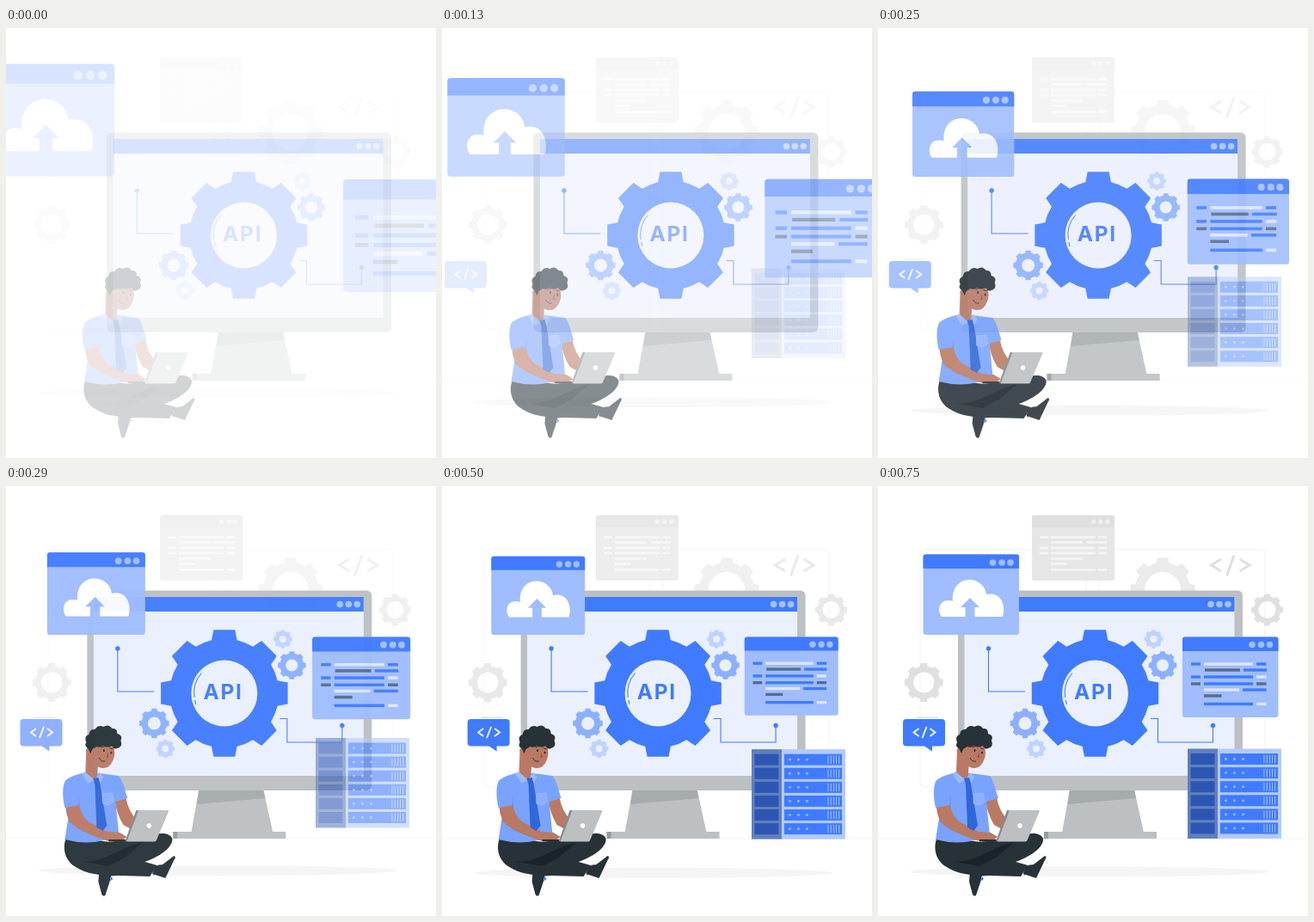
An HTML page for the animation above (0.93 s loop, 500 by 500 pixels).

```html
<!DOCTYPE html>
<html lang="en">
<head>
<meta charset="utf-8">
<title>API illustration</title>
<style>
  html, body { margin: 0; width: 100%; height: 100%; overflow: hidden; background: #fff; }
  svg { display: block; width: 100%; height: 100%; }
  .blue { fill: #407bff; }
  .dark { fill: #263238; }
  .skin { fill: #b97964; }
  .shirt { fill: #79a3ff; }
  .line { fill: none; stroke: #407bff; stroke-width: 1.1; }
</style>
</head>
<body>
<svg viewBox="0 0 500 500">
  <g id="backdrop">
    <g fill="none" stroke="#ebebeb" stroke-width=".7">
      <path d="M0 410H500"/>
      <rect x="49" y="74" width="193" height="276" rx="4"/>
      <rect x="257" y="74" width="193" height="276" rx="4"/>
    </g>
    <rect x="179" y="34" width="96" height="76" rx="3" fill="#e6e6e6"/>
    <path d="M179 48V37q0-3 3-3h90q3 0 3 3V48z" fill="#dfdfdf"/>
    <g id="greyLines"></g>
    <g fill="none" stroke="#e0e0e0" stroke-width="3">
      <path d="M399 85L387.500 92L399 99M414 80.500L405.500 104.500M420.500 85L432 92L420.500 99"/>
    </g>
  </g>

  <ellipse id="shadow" cx="246" cy="448.500" rx="208" ry="6" fill="#f5f5f5"/>

  <g id="monitor">
    <path d="M223 353H298L309 403H214z" fill="#bcc0c2"/>
    <path d="M223 353H298L300 363L220.500 370z" fill="#a6abad"/>
    <rect x="193" y="402" width="131" height="8" fill="#bcc0c2"/>
    <rect x="193" y="402" width="5" height="8" fill="#969b9e"/>
    <rect x="93" y="121.500" width="331" height="232.500" rx="6" fill="#bcc0c2"/>
    <rect x="100.500" y="129" width="314" height="208" fill="#ebf0ff"/>
    <rect x="100.500" y="129" width="314" height="17" class="blue"/>
    <path class="line" d="M128.500 189V239H171M317 270.500H325.500V298H389.500V279"/>
    <circle cx="128.500" cy="189" r="2.700" class="blue"/>
    <circle cx="389.500" cy="278.500" r="2.700" class="blue"/>
    <path class="line" d="M226 217.500A35 35 0 0 0 217.700 246M218.200 249L219.500 254"/>
    <text x="251.200" y="248" text-anchor="middle" font-family="Inter, sans-serif" font-size="24.500"
      font-weight="700" letter-spacing="1.700" class="blue">API</text>
  </g>

  <g id="server">
    <rect x="395" y="305.500" width="74" height="104.500" fill="#b1caff"/>
    <rect x="360" y="305.500" width="35" height="104.500" fill="#6080bd"/>
  </g>

  <g id="windows">
    <g id="upload">
      <rect x="52.500" y="79.500" width="111.500" height="93.500" rx="3" fill="#9fbdff"/>
      <path class="blue" d="M52.500 96V82.500q0-3 3-3H161q3 0 3 3V96z"/>
      <path fill="#fff" d="M74 152C69 146 70 133 82 133Q85 133 87 134C84 102 123 102 126 126C143 122 149 139 145 152z"/>
      <path fill="#9fbdff" d="M107 130L118 141H112.500V152.500H101.500V141H96z"/>
    </g>
    <g id="code">
      <rect x="354" y="175.500" width="111.500" height="93.500" rx="3" fill="#9fbdff"/>
      <path class="blue" d="M354 192V178.500q0-3 3-3H462.500q3 0 3 3V192z"/>
    </g>
  </g>

  <g id="man">
    <path class="skin" d="M120 446L137 444L136 452L120 454zM166 443L178 440L181 447L170 453z"/>
    <path class="dark" d="M69 408C64 419 66 434 78 442C92 452 112 453 129 453L166 454L174 441L160 437C180 430 193 419 192 410C189 402 176 403 162 407L120 414z"/>
    <path d="M84 436C103 440 122 428 142 419L158 414L137 432L118 442z" fill="#1a2328"/>
    <path class="dark" d="M107 447L121 452L119 461L114 476Q112 478 110 475L106 460zM172 442L181 440L194 430Q197 431 194 435L184 456L169 451z"/>
    <path d="M119 460L121 454L123 457z" class="blue"/>
    <path class="skin" d="M125 365L138 362Q141 379 151 388L144 399L135 394Q127 381 125 365z"/>
    <path class="shirt" d="M91 333L107 334L130 337C135 344 137 354 140 363L126 367L130 406Q100 420 67 411L73 374L67 374C64 361 64 348 68 342Q76 336 91 333z"/>
    <path d="M84 352Q83 364 85 371L74 374L71 390L89 403L83 372z" fill="#6691f0"/>
    <path class="skin" d="M68 374L84 371Q86 383 94 390L117 402L131 403L139 408L134 412L118 413Q91 405 76 394Q69 387 68 374z"/>
    <path class="skin" d="M92 306L106 318L105 333Q105 341 101 342Q94 338 91 332z"/>
    <path d="M90 332L102 342L94 346L87 335zM102 342L107 333L112 338L108 346z" fill="#9abaff"/>
    <path d="M100 340L106 339L108 346L116 395L111 401L104 397L102 347z" fill="#2f66d8"/>
    <path d="M111 358L122 357L124 367L118 371L111 369z" fill="#8cb0ff" stroke="#a9c4ff" stroke-width=".6"/>
    <path class="skin" d="M98 300Q110 292 123 300Q127 311 123 319Q119 329 110 328Q102 326 99 319L94 313Q89 306 95 303z"/>
    <path class="dark" d="M99 306L97 311L94 305Q89 303 92 298Q89 291 95 289Q96 282 102 283Q106 277 112 280Q118 276 122 282Q128 281 128 288Q135 290 132 296Q135 303 128 305Q124 307 122 302Q116 305 112 302Q108 305 104 303z"/>
    <path class="dark" d="M111.500 307.500a1 1.500 0 1 0 2 0a1 1.500 0 1 0-2 0M120 310a1 1.500 0 1 0 2 0a1 1.500 0 1 0-2 0"/>
    <path d="M117 309L118 316L115.500 316" fill="#a24e3f"/>
    <path d="M107 316Q109 321 114 320M110 304L114 302.500M119 304.500L123 306" fill="none" stroke="#263238" stroke-width=".9"/>
    <path d="M118 411H172V413.500H118z" fill="#263238"/>
    <path d="M150 377L153 377L142 413H137z" fill="#858b8e"/>
    <path d="M153 377H186.500Q188.500 377 187.500 379L173.500 412Q173 413.500 171 413.500H139z" fill="#bcc0c2"/>
    <circle cx="165" cy="395" r="2.700" fill="#fff"/>
  </g>

  <g id="bubble">
    <path d="M45 269.200H70" stroke="#c4c4c4" stroke-width=".8"/>
    <path class="blue" d="M33 271H74q4 0 4 4V298.500q0 4-4 4H63V308.500L54 302.500H33q-4 0-4-4V275q0-4 4-4z"/>
    <path d="M47.500 282L41.500 286.500L47.500 291M56.500 280L51.500 293M60.500 282L66.500 286.500L60.500 291" fill="none" stroke="#fff" stroke-width="1.800"/>
  </g>
</svg>
<script>
const $ = id => document.getElementById(id);

function add(parent, tag, attrs, first) {
  const el = document.createElementNS('http://www.w3.org/2000/svg', tag);
  for (const key in attrs) el.setAttribute(key, attrs[key]);
  $(parent)[first ? 'prepend' : 'append'](el);
}

function gear(parent, x, y, r, hole, fill, first) {
  const at = (radius, deg) => {
    const a = deg * Math.PI / 180;
    return (x + radius * Math.cos(a)).toFixed(2) + ' ' + (y + radius * Math.sin(a)).toFixed(2);
  };
  const body = r * .85;
  let d = '';
  for (let a = 0; a < 360; a += 45) {
    d += (a ? `A${body} ${body} 0 0 1 ` : 'M') + at(body, a - 13.5);
    d += 'L' + at(r, a - 9.6) + 'L' + at(r, a + 9.6) + 'L' + at(body, a + 13.5);
  }
  d += `A${body} ${body} 0 0 1 ${at(body, -13.5)}Z`;
  d += `M${x - hole} ${y}a${hole} ${hole} 0 1 0 ${2 * hole} 0a${hole} ${hole} 0 1 0 ${-2 * hole} 0`;
  add(parent, 'path', { d, fill, 'fill-rule': 'evenodd' }, first);
}

const dots = (parent, xs, cy, r, fill) =>
  xs.forEach(cx => add(parent, 'circle', { cx, cy, r, fill }));

const bar = (parent, x1, x2, y, height, fill) =>
  add(parent, 'rect', { x: x1, y: y - height / 2, width: x2 - x1, height, fill });

gear('backdrop', 331, 121, 38, 21, '#ebebeb', true);
gear('backdrop', 452.5, 144, 18.7, 10, '#e0e0e0');
gear('backdrop', 53.3, 228.5, 22.7, 12, '#e0e0e0');
gear('monitor', 252.5, 241, 74.8, 38.5, '#407bff');
gear('monitor', 171, 276, 17.5, 7.5, '#8cb0ff');
gear('monitor', 331, 208.5, 16.5, 7, '#8cb0ff');
gear('monitor', 184, 305.5, 11, 4, '#c0d3ff');
gear('monitor', 320.5, 178, 11, 4, '#c0d3ff');

dots('backdrop', [250.5, 258.7, 267], 41.5, 2.7, '#f0f0f0');
dots('monitor', [387, 397, 407], 137.5, 3.8, '#a5c1ff');
dots('upload', [133.5, 144, 154], 89, 3.8, '#9fbdff');
dots('code', [435, 445.5, 455.5], 184.5, 3.8, '#9fbdff');

for (const y of [59.5, 72, 78]) {
  bar('greyLines', 188, 198, y, 2.5, '#f5f5f5');
  bar('greyLines', 201, 253, y, 2.5, '#f5f5f5');
  bar('greyLines', 256, 266, y, 2.5, '#f5f5f5');
}
for (const [x1, x2, y] of [[201, 238, 65.5], [242, 266, 65.5], [201, 238, 84.5],
  [201, 219, 90.5], [201, 253, 97.5], [256, 266, 97.5]])
  bar('greyLines', x1, x2, y, 2.5, '#f5f5f5');

const BLUE = '#407bff', DARK = '#566c8f', PALE = '#dce6ff';
for (const [y, ...parts] of [
  [207, 364, 375, BLUE, 379, 436, PALE, 440, 451.5, BLUE],
  [214, 380, 421, DARK, 425, 452, BLUE],
  [222, 364, 375, BLUE, 379, 436, BLUE, 440, 451.5, PALE],
  [230, 364, 375, DARK, 379, 436, BLUE, 440, 451.5, DARK],
  [237, 379, 420, PALE, 424, 451.5, BLUE],
  [244, 379, 399.5, DARK],
  [253.5, 379, 436, BLUE, 440, 451.5, PALE],
]) for (let i = 0; i < parts.length; i += 3)
  bar('code', parts[i], parts[i + 1], y, 3.4, parts[i + 2]);

for (let i = 0; i < 6; i++) {
  const y = 317.5 + i * 16.1;
  bar('server', 363.5, 391.5, y, 13, '#2d56b3');
  bar('server', 398, 465, y, 13, BLUE);
  dots('server', [404.5, 414.5, 424.5], y, 1.4, '#9fbdff');
  for (let x = 448.5; x < 463; x += 3.2) bar('server', x, x + .9, y, 9.5, '#b1caff');
}

// cubic-bezier(.36, -.01, .5, 1.38), solved for y at x
function ease(x) {
  if (x >= 1) return 1;
  const curve = (s, a, b) => 3 * (1 - s) ** 2 * s * a + 3 * (1 - s) * s * s * b + s ** 3;
  let lo = 0, hi = 1;
  for (let i = 0; i < 24; i++) {
    const mid = (lo + hi) / 2;
    if (curve(mid, .36, .5) < x) lo = mid; else hi = mid;
  }
  return curve(lo, -.01, 1.38);
}

function place(id, opacity, transform) {
  $(id).setAttribute('opacity', Math.max(0, Math.min(1, opacity)));
  $(id).setAttribute('transform', transform);
}

const LOOP = 930, STEP = 1000 / 24, LAST = 18;

function draw(now) {
  const step = Math.min(LAST, Math.floor((now % LOOP + 4) / STEP));
  const early = ease(.235 + step * .0573);
  const late = ease(.02 + step * .0573);
  const slide = 30 * (1 - early), drop = -30 * (1 - late);
  const zoom = 1 + .5 * (1 - early);

  place('backdrop', .1 + .05 * step, '');
  place('shadow', early, `translate(0 ${-slide})`);
  place('monitor', early, `translate(${slide} 0)`);
  place('man', early, `translate(${slide} 0)`);
  place('windows', early, `translate(258.75 174) scale(${zoom}) translate(-258.75 -174)`);
  place('server', late, `translate(0 ${drop})`);
  place('bubble', late, `translate(${drop} 0)`);
}

const start = performance.now();
function tick() {
  draw(performance.now() - start);
  requestAnimationFrame(tick);
}
tick();
</script>
</body>
</html>
```
